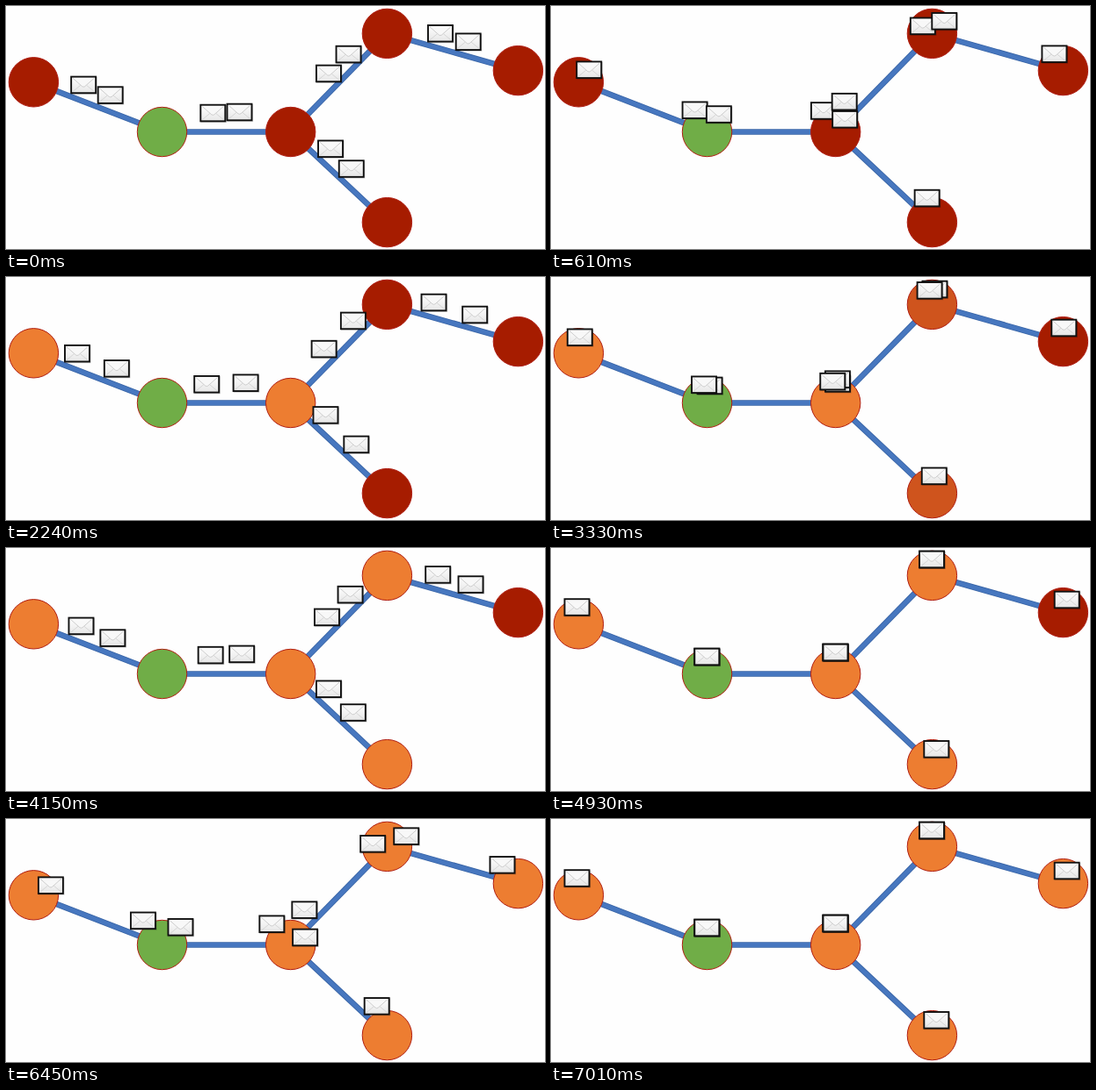
An HTML page for the animation above (9650 ms loop, 613x277 px).

```html
<!DOCTYPE html>
<html lang="en">
<head>
<meta charset="utf-8">
<title>Message passing</title>
<style>
  html, body { margin: 0; width: 100%; height: 100%; overflow: hidden; background: #fefefe; }
  svg { display: block; width: 100%; height: 100%; }
</style>
</head>
<body>
<svg id="stage" viewBox="0 0 613 277">
  <defs>
    <linearGradient id="paper" x1="0" y1="0" x2="0" y2="1">
      <stop offset="0" stop-color="#fff"/>
      <stop offset="1" stop-color="#e6e6e6"/>
    </linearGradient>
    <g id="envelope">
      <rect x="-14" y="-9" width="29.6" height="20" fill="#000" opacity=".2"/>
      <rect x="-14" y="-9.3" width="28" height="18.6" fill="url(#paper)" stroke="#111" stroke-width="1.9"/>
      <path d="M-12 7.5L-3.5 .5M12 7.5L3.5 .5" fill="none" stroke="#d6d6d6"/>
      <path d="M-12 -7.5L-1.5 1.8Q0 2.8 1.5 1.8L12 -7.5" fill="#f8f8f8" stroke="#cdcdcd"/>
    </g>
  </defs>
</svg>
<script>
// All times in ms
const LOOP = 9650;
const STEP = 160, FIRST_STEP = 110;   // the picture advances in steps
const ROUND = 1951, MOVE = 1740;      // one exchange: a move, then a rest
const HEAD_START = 775;               // the loop opens in the middle of a move
const ROUNDS = 4;
const FADE = 555, FADE_LEAD = 140;    // colours start to change just before the next move
const RED = [166, 28, 0], ORANGE = [237, 125, 49], GREEN = [112, 173, 71];

// hops: distance from the green node; port: where its envelopes rest
const nodes = {
  A: { x: 31.4, y: 86.8, hops: 1, port: [29.5, 67.5] },
  B: { x: 177.5, y: 143.5, hops: 0, port: [177.3, 124] },
  C: { x: 323.7, y: 143.5, hops: 1, port: [323.5, 119] },
  D: { x: 433.4, y: 31.4, hops: 2, port: [433, 13] },
  E: { x: 582.4, y: 73.6, hops: 3, port: [586.7, 59] },
  F: { x: 433.4, y: 246.6, hops: 2, port: [438.3, 229.3] }
};
const links = ["AB", "BC", "CF", "CD", "DE"].map(pair => [...pair].map(name => nodes[name]));

const stage = document.getElementById("stage");
function add(tag, attributes) {
  const element = document.createElementNS("http://www.w3.org/2000/svg", tag);
  for (const [name, value] of Object.entries(attributes)) element.setAttribute(name, value);
  return stage.appendChild(element);
}

const rgb = color => `rgb(${color.map(Math.round)})`;
const clamp = v => Math.min(1, Math.max(0, v));
const mix = (a, b, t) => a.map((v, i) => v + (b[i] - v) * t);
const ease = t => t < .5 ? 2 * t * t : 1 - 2 * (1 - t) ** 2;

for (const [a, b] of links) {
  const line = { x1: a.x, y1: a.y, x2: b.x, y2: b.y };
  add("line", { ...line, stroke: "#3763a5", "stroke-width": 6.6 });
  add("line", { ...line, stroke: "#4777bf", "stroke-width": 5 });
}
for (const node of Object.values(nodes)) {
  node.shape = add("circle", { cx: node.x, cy: node.y, r: 28.2,
    fill: rgb(GREEN), stroke: "#b01e12", "stroke-width": 1 });
}

// Each link carries one envelope either way; those heading back lie on top
const envelopes = [...links, ...links.map(([a, b]) => [b, a])].map(([from, to]) =>
  ({ start: from.port, end: to.port, shape: add("use", { href: "#envelope" }) }));

function draw(ms) {
  const stepped = Math.max(0, FIRST_STEP + Math.floor((ms - FIRST_STEP) / STEP) * STEP);
  const clock = stepped + HEAD_START;
  const round = Math.min(Math.floor(clock / ROUND), ROUNDS - 1);
  const progress = ease(clamp((clock - round * ROUND) / MOVE));
  const travelled = round % 2 ? 1 - progress : progress;

  for (const { shape, hops } of Object.values(nodes)) {
    const warmth = clamp((clock - hops * ROUND + FADE_LEAD) / FADE);
    if (hops) shape.setAttribute("fill", rgb(mix(RED, ORANGE, warmth)));
  }
  for (const { shape, start, end } of envelopes) {
    shape.setAttribute("transform", `translate(${mix(start, end, travelled)})`);
  }
}

function tick() {
  draw(performance.now() % LOOP);
  requestAnimationFrame(tick);
}
tick();
</script>
</body>
</html>
```
